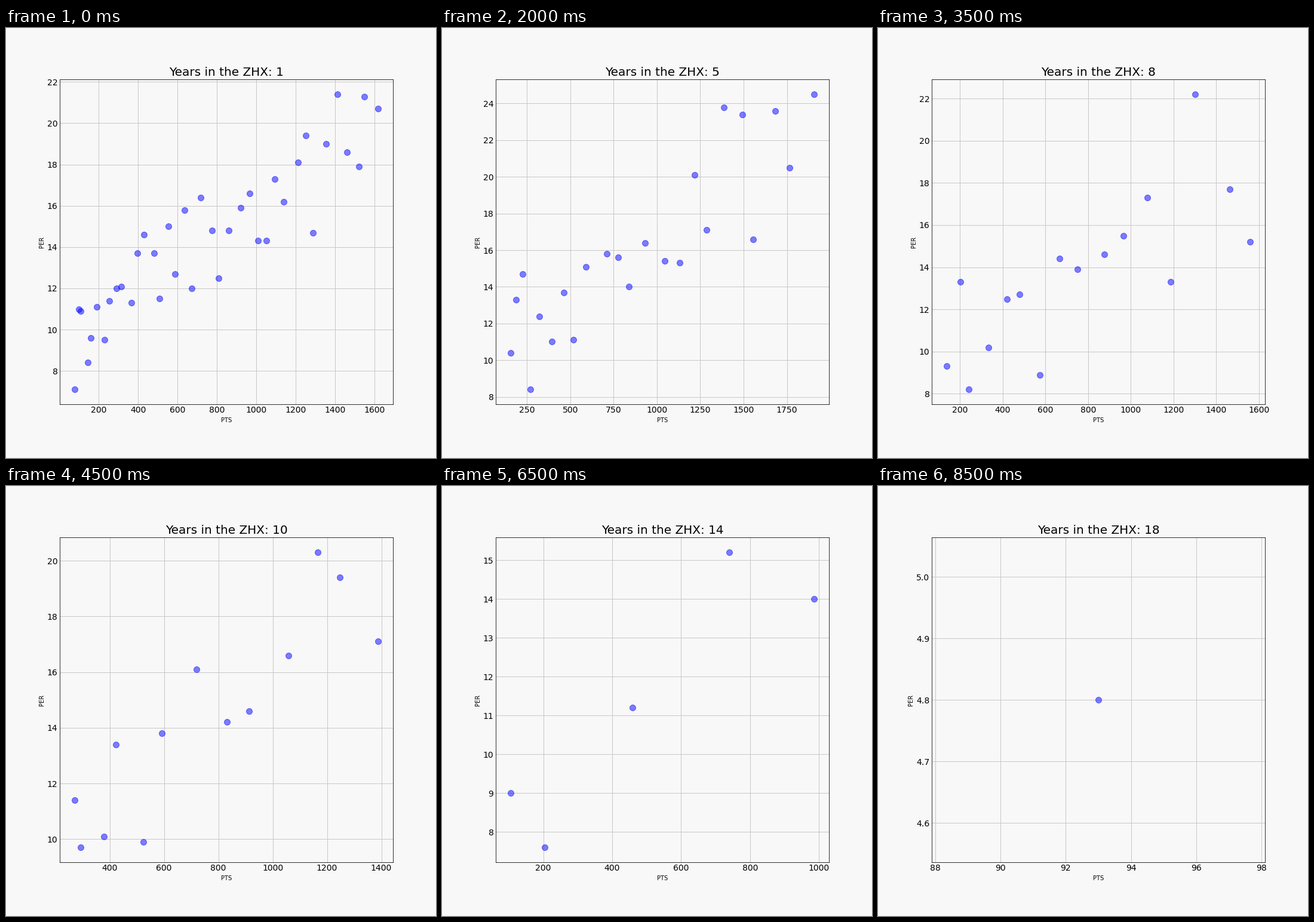
A matplotlib script for the animation above (9 s loop, 720 by 720 pixels).

```python
import matplotlib.pyplot as plt
import numpy as np
from matplotlib.animation import FuncAnimation

plt.rcParams.update({
    "font.family": "DejaVu Sans",
    "font.size": 14,
    "figure.facecolor": "#f8f8f8",
    "axes.facecolor": "#f8f8f8",
    "axes.grid": True,
    "axes.axisbelow": True,
    "axes.titlesize": 20,
    "axes.labelsize": 10,
    "grid.color": "#c8c8c8",
    "grid.linewidth": 1,
    "xtick.major.size": 0,
    "ytick.major.size": 0,
})

YEARS = 18

# year: players, lowest and highest points, lowest and highest rating;
# the years between are interpolated
KEYS = {
    1: (38, 79, 1616, 7.1, 21.4),
    2: (36, 25, 1709, 5.0, 22.6),
    3: (35, 18, 1711, 6.6, 21.7),
    4: (29, 60, 1800, 6.2, 23.8),
    5: (23, 158, 1905, 8.4, 24.5),
    7: (17, 72, 1642, 7.5, 23.1),
    10: (13, 272, 1387, 9.7, 20.3),
    11: (11, 100, 1330, 3.4, 20.6),
    12: (9, 90, 1250, 8.3, 19.2),
    14: (5, 106, 985, 7.6, 15.2),
    18: (1, 93, 93, 4.8, 4.8),
}


def unit(v):
    """Stretch values to fill 0..1."""
    return (v - v.min()) / (np.ptp(v) or 1)


def season(year):
    """Points spread along a curve, with the rating rising noisily."""
    count, x0, x1, y0, y1 = (np.interp(year, list(KEYS), column)
                             for column in zip(*KEYS.values()))
    n = round(count)
    rng = np.random.default_rng(year)
    rank = np.arange(n) + rng.uniform(-0.3, 0.3, n)
    u = unit(unit(rank) ** 1.3)
    v = unit(0.7 * u + rng.normal(0, 0.15, n))
    return np.round(x0 + (x1 - x0) * u), np.round(y0 + (y1 - y0) * v, 1)


fig, ax = plt.subplots(figsize=(10, 10), dpi=72)
fig.subplots_adjust(left=0.125, right=0.9, bottom=0.125, top=0.88)


def draw(i):
    year = i + 1
    ax.clear()
    ax.scatter(*season(year), s=100, c="blue", alpha=0.5, linewidths=1)
    ax.set_title(f"Years in the ZHX: {year}")
    ax.set_xlabel("PTS")
    ax.set_ylabel("PER")


anim = FuncAnimation(fig, draw, frames=YEARS, init_func=lambda: draw(0),
                     interval=500, repeat=True, repeat_delay=0)
plt.show()
```
